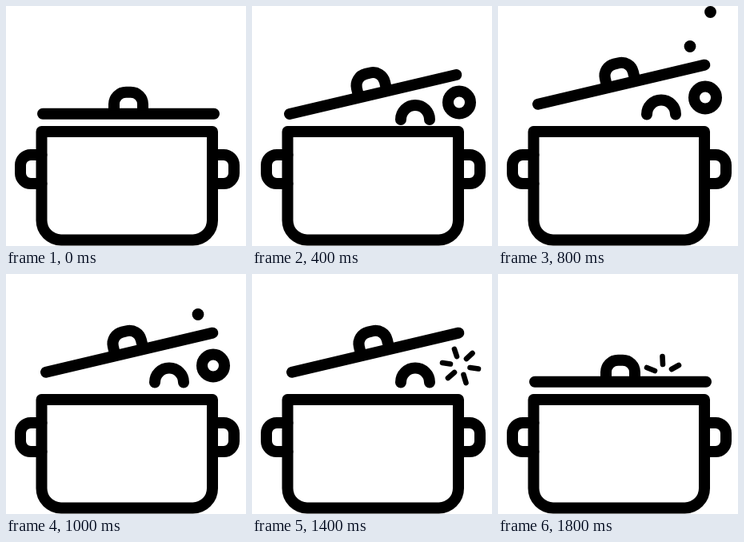
An HTML page for the animation above (2 s loop, 300 by 300 pixels).

```html
<!DOCTYPE html>
<html lang="en">
<head>
<meta charset="utf-8">
<title>Boiling pot</title>
<style>
  html, body { margin: 0; width: 100%; height: 100%; overflow: hidden; background: #fff; }
  svg { display: block; width: 100vw; height: 100vh; }
  .line { fill: none; stroke: #000; stroke-width: 14; stroke-linecap: round; stroke-linejoin: round; }
  .thin { stroke-width: 6.6; }
</style>
</head>
<body>
<svg viewBox="0 0 300 300">
  <g class="line">
    <path d="M44.5 157H258V268a24.5 24.5 0 0 1-24.5 24.5H69A24.5 24.5 0 0 1 44.5 268Z"/>
    <path id="grip" d="M44.5 186H31a13 13 0 0 0-13 13V209a13 13 0 0 0 13 13H44.5"/>
    <use href="#grip" transform="matrix(-1 0 0 1 303 0)"/>
    <g id="lid">
      <path d="M0 0H214M89 0V-12a15 15 0 0 1 15-15H110a15 15 0 0 1 15 15V0"/>
    </g>
    <path id="arch" d="M-18 0a18 18 0 0 1 36 0"/>
    <circle id="ring" r="14"/>
    <path id="burst" class="thin" d="M253 94l3 9M275.5 99l-7.5 7M272.5 117l10.5 1.5M264.5 126l3 10M253 123l-8 7M238 111l10 1.5"/>
    <path id="spark" class="thin" d="M186 117l10 4M205.5 103l.5 10M217 119l9-5"/>
  </g>
  <circle id="drop1" cx="240" cy="50.5" r="7.4"/>
  <circle id="drop2" cx="265.5" cy="7.5" r="7.4"/>
</svg>
<script>
const STEP = 200;
const part = id => document.getElementById(id);

// Lid hinge x, y and angle; heights of the rising bubbles
const shut = { lid: [46, 134.7, 0] };
const ajar = { lid: [45, 136.5, -10.05], arch: 143 };
const open = { lid: [47, 135, -13.25], arch: 142, ring: 120.5 };
const high = { lid: [50, 122.7, -13.25], arch: 135.5, ring: 114.5 };

const steps = [
  shut,
  ajar,
  open,
  { ...high, drop1: 1 },
  { ...high, drop1: 1, drop2: 1 },
  { ...high, drop1: 1 },
  open,
  { ...high, ring: 0, burst: 1 },
  ajar,
  { ...shut, spark: 1 }
];

const show = (id, on) => part(id).setAttribute("visibility", on ? "visible" : "hidden");

function place(id, x, y) {
  show(id, y);
  if (y) part(id).setAttribute("transform", `translate(${x} ${y})`);
}

function draw(pose) {
  const [x, y, angle] = pose.lid;
  part("lid").setAttribute("transform", `translate(${x} ${y}) rotate(${angle})`);
  place("arch", 204, pose.arch);
  place("ring", 259, pose.ring);
  for (const id of ["burst", "spark", "drop1", "drop2"]) show(id, pose[id]);
}

let start;
function tick(now) {
  start ??= now;
  const i = Math.floor(Math.max(0, now - start) / STEP) % steps.length;
  draw(steps[i]);
  requestAnimationFrame(tick);
}
draw(steps[0]);
requestAnimationFrame(tick);
</script>
</body>
</html>
```
